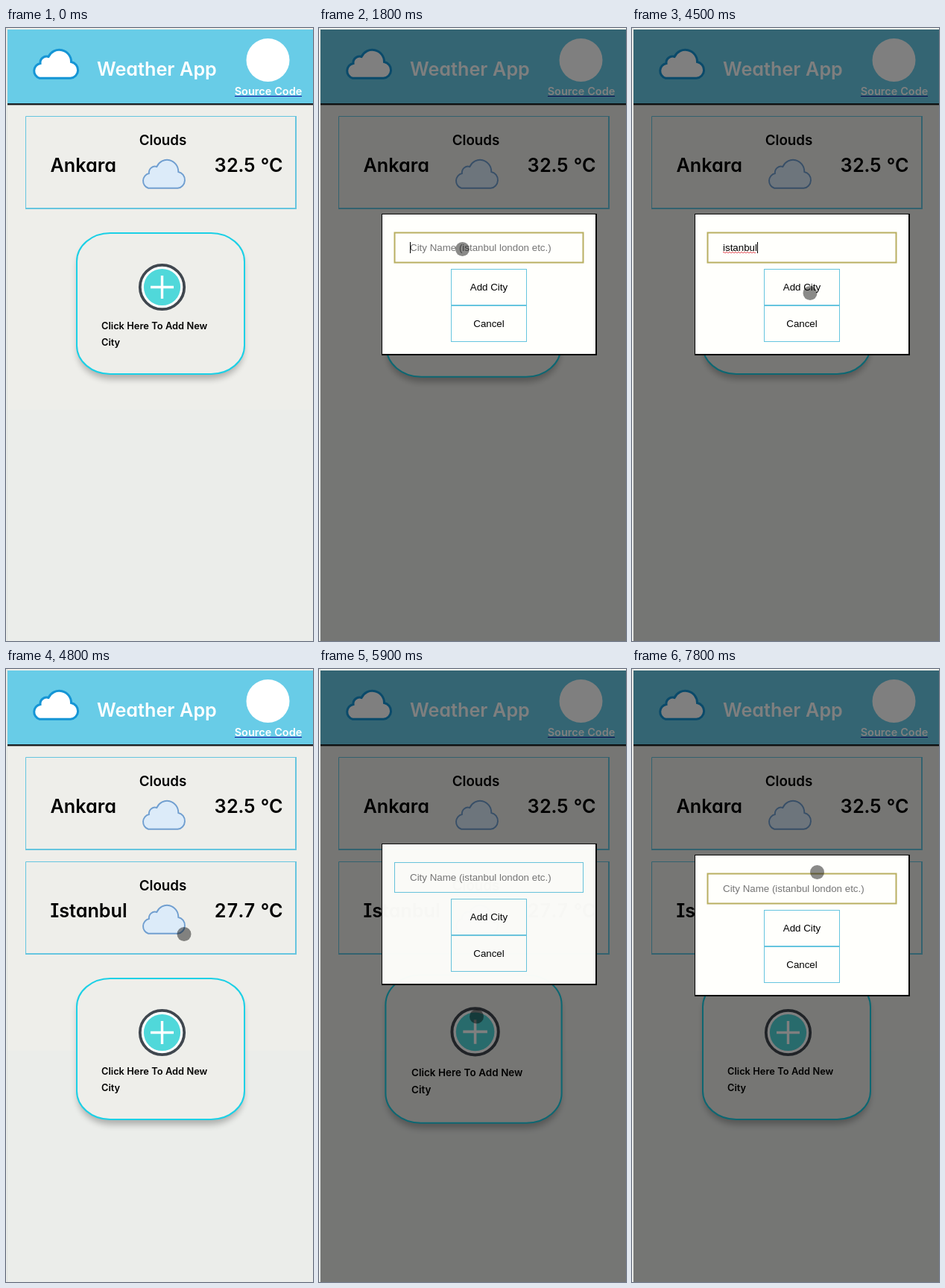
Animation of 412 by 822 pixels, one loop 8000 ms. Source, as an HTML page:

```html
<!DOCTYPE html>
<html lang="en">
<head>
<meta charset="utf-8">
<title>Weather App</title>
<style>
  html, body { margin: 0; width: 100%; height: 100%; overflow: hidden; background: #eff0ec; }
  svg { display: block; width: 412px; height: 822px; }
  text { white-space: pre; }
  .ui { font-family: Inter, sans-serif; font-weight: 600; font-feature-settings: "cv11", "cv08", "tnum"; }
  .big { font-size: 25.2px; }
  .mid { font-size: 18.8px; }
  .form { font: 13.333px "Liberation Sans", Arial, sans-serif; }
  .c { text-anchor: middle; }
  .line { fill: none; stroke: #66c5df; }
</style>
</head>
<body>
<svg viewBox="0 0 412 822">
  <defs>
    <path id="cloud" d="M11 39.3H52.5A11 11 0 0 0 53.5 17.5A16 16 0 0 0 23 10.5A8.5 8.5 0 0 0 12 19.5A10.2 10.2 0 0 0 11 39.3Z"/>
    <clipPath id="page"><rect x="2" y="2" width="410" height="820"/></clipPath>
    <filter id="blur" x="-10%" y="-10%" width="120%" height="125%"><feGaussianBlur stdDeviation="4"/></filter>
    <g id="city">
      <path class="line" d="M26.5 243V118.5H390"/>
      <path class="line" stroke-width="2" d="M389 118V242H26"/>
      <text class="ui mid c" x="210.5" y="157">Clouds</text>
      <use href="#cloud" transform="translate(180.5 175.5) scale(.95 1)" fill="#dcebf9" stroke="#719fd0" stroke-width="2"/>
    </g>
  </defs>

  <rect width="412" height="822" fill="#eff0ec"/>
  <rect x="1" width="1" height="822" fill="#e0e3e0"/>
  <g clip-path="url(#page)">
    <rect x="2" y="2" width="410" height="510" fill="#eeeeea"/>
    <rect x="2" y="512" width="410" height="310" fill="#ebedea"/>

    <rect x="2" y="2" width="410" height="99" fill="#68cce7"/>
    <rect x="2" y="101" width="410" height="2" fill="#1c2022"/>
    <rect x="2" y="103" width="410" height="1" fill="#a5a5a2"/>
    <use href="#cloud" x="34" y="28" fill="#fff" stroke="#1595d5" stroke-width="3"/>
    <text class="ui big" x="122" y="64" fill="#fff">Weather App</text>
    <circle cx="351.5" cy="43" r="29" fill="#fff"/>
    <text class="ui c" x="352" y="90" fill="#fff" font-size="14.5">Source Code</text>
    <rect x="307" y="91" width="90" height="1" fill="#1414a0"/>

    <use href="#city"/>
    <text class="ui big" x="59.5" y="193">Ankara</text>
    <text class="ui big c" x="325.5" y="193">32.5 °C</text>
    <g id="second" transform="translate(0 140)">
      <use href="#city"/>
      <text class="ui big" x="59.5" y="193">Istanbul</text>
      <text class="ui big c" x="325.5" y="193">27.7 °C</text>
    </g>

    <g id="add">
      <rect x="96" y="282" width="223" height="189" rx="45" ry="38" fill="#000" opacity=".26" filter="url(#blur)"/>
      <rect x="95" y="275" width="225" height="189" rx="45" ry="38" fill="#eeeeea" stroke="#1bd0e6" stroke-width="2"/>
      <circle cx="209.5" cy="347.5" r="29.7" fill="#fff" stroke="#40474f" stroke-width="3.8"/>
      <circle cx="209.5" cy="347.5" r="24.6" fill="#50d8da"/>
      <path d="M194 347.5H225M209.5 332V363" stroke="#fff" stroke-width="3.4"/>
      <g class="ui" font-size="12.8">
        <text x="128" y="404">Click Here To Add New</text>
        <text x="128" y="426">City</text>
      </g>
    </g>

    <rect id="dim" x="2" y="2" width="410" height="820" opacity=".5"/>

    <g id="modal">
      <rect x="84" y="249" width="289" height="190" fill="#050505"/>
      <rect x="85" y="250" width="286" height="187" fill="#fffffc"/>
      <rect id="field" x="101.5" y="274.5" width="253" height="40" fill="none"/>
      <rect class="line" x="177.5" y="323.5" width="101" height="48"/>
      <rect class="line" x="177.5" y="372.5" width="101" height="48"/>
      <g class="form">
        <text id="hint" x="122" y="299" fill="#757575">City Name (istanbul london etc.)</text>
        <text id="typed" x="122" y="299"></text>
        <text class="c" x="228" y="352">Add City</text>
        <text class="c" x="228" y="401">Cancel</text>
      </g>
      <path id="squiggle" fill="none" stroke="#e2555c"/>
      <rect id="caret" y="287" width="1" height="15"/>
    </g>

    <rect id="flash" x="94" y="274" width="227" height="191" fill="#00b6e2" opacity=".4"/>
    <g id="cursor">
      <circle id="dot" r="9.5"/>
      <circle id="ring" r="10.3" fill="none" stroke="#fff" stroke-opacity=".65" stroke-width="1.4"/>
    </g>
  </g>
</svg>
<script>
const LOOP = 8000, STEP = 100;
const OPEN = [907, 5588];          // taps on the add card
const BLUR = [1752, 7250];         // taps on the text field
const WORD = 'istanbul';
const KEYS = [2400, 2500, 2600, 2800, 2900, 3100, 3100, 3300];
const PATH = [                     // time, x, y of the pointer
  [400, 158, 248], [500, 210, 345], [600, 198, 397.5], [1400, 198, 398],
  [1700, 192.5, 296.5], [3700, 192.5, 296.5], [3900, 234, 340], [4100, 239, 355.5],
  [5000, 239, 355.5], [5200, 214, 452], [5300, 198, 497], [5400, 211.5, 466],
  [6000, 211.5, 466], [6400, 239, 290], [6500, 239, 290], [6600, 248.5, 271.5],
  [6900, 248.5, 271.5], [7000, 248.5, 272.5]
];

const el = {};
document.querySelectorAll('svg [id]').forEach(n => el[n.id] = n);
const set = (n, attrs) => { for (const k in attrs) n.setAttribute(k, attrs[k]); };
const show = (n, on) => n.setAttribute('visibility', on ? 'visible' : 'hidden');
const within = (t, a, b) => t >= a && t < b;

const bezier = (s, a, b) => 3 * s * (1 - s) * (1 - s) * a + 3 * s * s * (1 - s) * b + s ** 3;

// The CSS "ease" curve
function ease(x) {
  if (x <= 0) return 0;
  if (x >= 1) return 1;
  let lo = 0, hi = 1;
  for (let i = 0; i < 24; i++) {
    const mid = (lo + hi) / 2;
    if (bezier(mid, .25, .25) < x) lo = mid; else hi = mid;
  }
  return bezier(lo, .1, 1);
}

function pointer(t) {
  const i = PATH.findIndex(p => p[0] > t);
  if (i < 0) return PATH[PATH.length - 1].slice(1);
  const [t0, x0, y0] = PATH[i - 1], [t1, x1, y1] = PATH[i];
  const k = (t - t0) / (t1 - t0);
  return [x0 + (x1 - x0) * k, y0 + (y1 - y0) * k];
}

function drawCard(t, drop) {
  let grow = 0;
  OPEN.forEach((start, i) => {
    grow += ease((t - start) / 300) - ease((t - BLUR[i]) / 300);
  });
  const scale = 1 + .05 * grow;
  const transform = `translate(207.5 ${369.5 + drop}) scale(${scale}) translate(-207.5 -369.5)`;
  set(el.add, { transform });
  set(el.flash, { transform });
}

function drawModal(t, start) {
  const p = ease((t - start) / 400);
  set(el.modal, { transform: `translate(0 ${-500 * (1 - p)})`, opacity: p });

  const focus = within(t, 1750, 4600) || t >= 7300;
  set(el.field, focus
    ? { stroke: '#b9af62', 'stroke-width': 2 }
    : { stroke: '#66c5df', 'stroke-width': 1 });

  const count = t < 4600 ? KEYS.filter(k => k <= t).length : 0;
  el.typed.textContent = WORD.slice(0, count);
  show(el.hint, !count);
  const width = count ? el.typed.getComputedTextLength() : 0;
  let d = '';
  for (let x = 0; x + 2 <= width; x += 4) d += `M${122 + x} 300.5h2m0 1h${Math.min(2, width - x - 2)}`;
  set(el.squiggle, { d });
  set(el.caret, { x: Math.round(122 + width) });
  show(el.caret, focus && !within(t, 3800, 4300) && t < 7800);
}

function draw(t) {
  const second = t >= 4700;
  const opened = within(t, 1000, 4600) || t >= 5700;
  const pressed = within(t, 1000, 1200) || within(t, 5700, 5900);

  show(el.second, second);
  drawCard(t, second ? 140 : 0);
  show(el.dim, opened);
  el.modal.style.display = opened ? '' : 'none';
  if (opened) drawModal(t, t < 5000 ? OPEN[0] : OPEN[1]);
  show(el.flash, pressed);

  el.cursor.style.display = t >= 400 ? '' : 'none';
  if (t >= 400) {
    const [x, y] = pointer(t);
    set(el.cursor, { transform: `translate(${x} ${y})` });
    set(el.dot, { opacity: pressed ? .62 : .46 });
    show(el.ring, pressed);
  }
}

const origin = performance.now();
function tick() {
  const t = (performance.now() - origin) % LOOP;
  draw(Math.floor(t / STEP) * STEP);
  requestAnimationFrame(tick);
}
tick();
</script>
</body>
</html>
```
